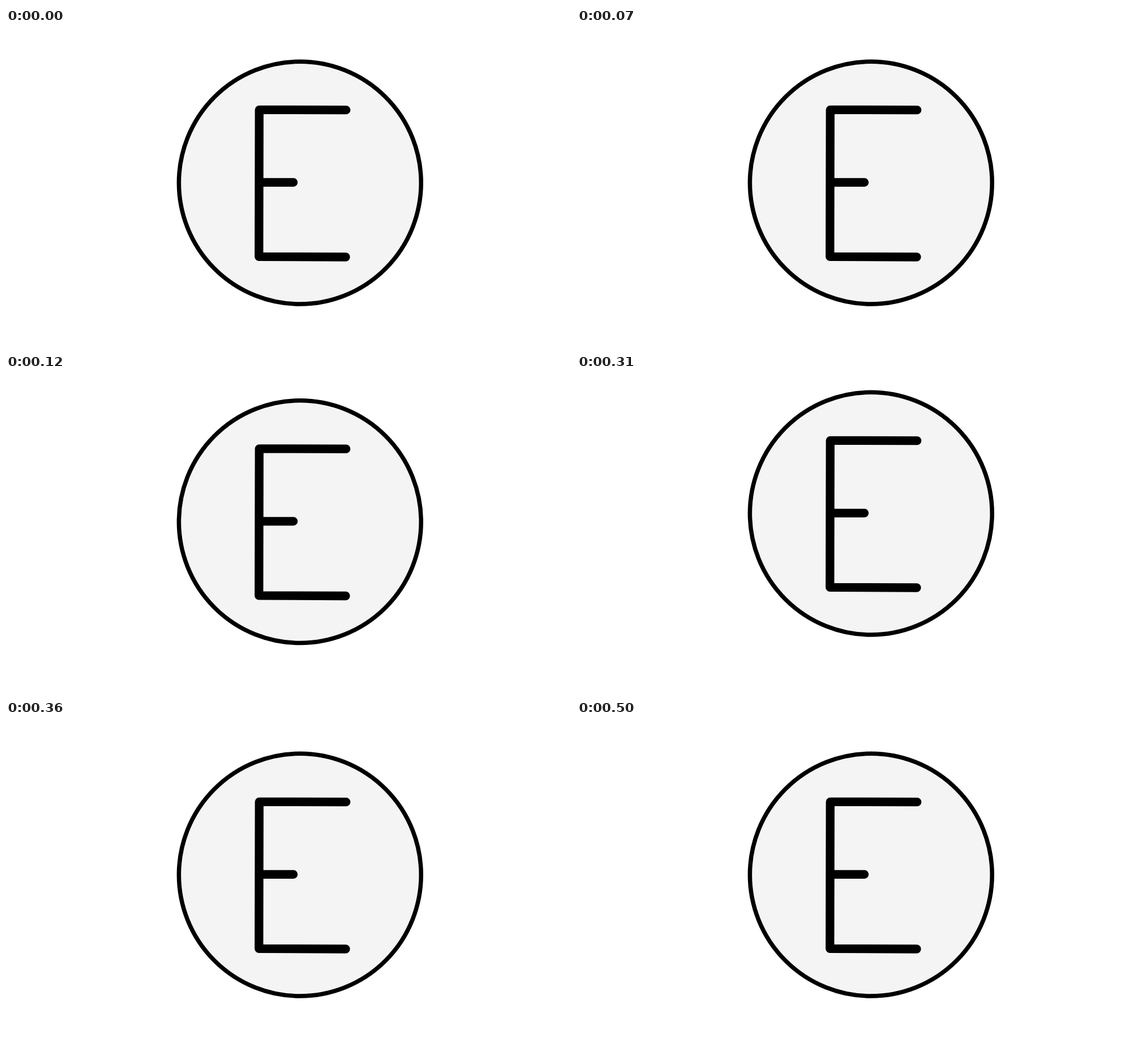
Recreate the animation shown at these times as an HTML page. Size 998 px wide and 561 px high, loop 600 ms.

```html
<!DOCTYPE html>
<html lang="en">
<head>
<meta charset="utf-8">
<title>Bouncing letter</title>
<style>
  html, body { margin: 0; width: 100%; height: 100%; overflow: hidden; background: #fff; }
  svg { display: block; width: 100%; height: 100%; }
</style>
</head>
<body>
<svg viewBox="0 0 998 561">
  <g id="badge" stroke="#000" stroke-linecap="round" stroke-linejoin="round">
    <circle cx="519.3" cy="273.1" r="213.9" fill="#f4f4f4" stroke-width="7.5"/>
    <path fill="none" stroke-width="15.3"
      d="M600.7 144.7 447.3 144.3 446.8 403.4 600 404M447 272.3H507.6"/>
  </g>
</svg>
<script>
  const STEP = 120;
  const LOOP = 600;
  const lifts = [0, 12.5, 27, 0, 0];
  const badge = document.getElementById('badge');
  const start = performance.now();

  function draw(now) {
    const time = Math.max(0, now - start) % LOOP;
    const lift = lifts[Math.floor(time / STEP)];
    badge.setAttribute('transform', `translate(0 ${-lift})`);
    requestAnimationFrame(draw);
  }
  draw(start);
</script>
</body>
</html>
```
